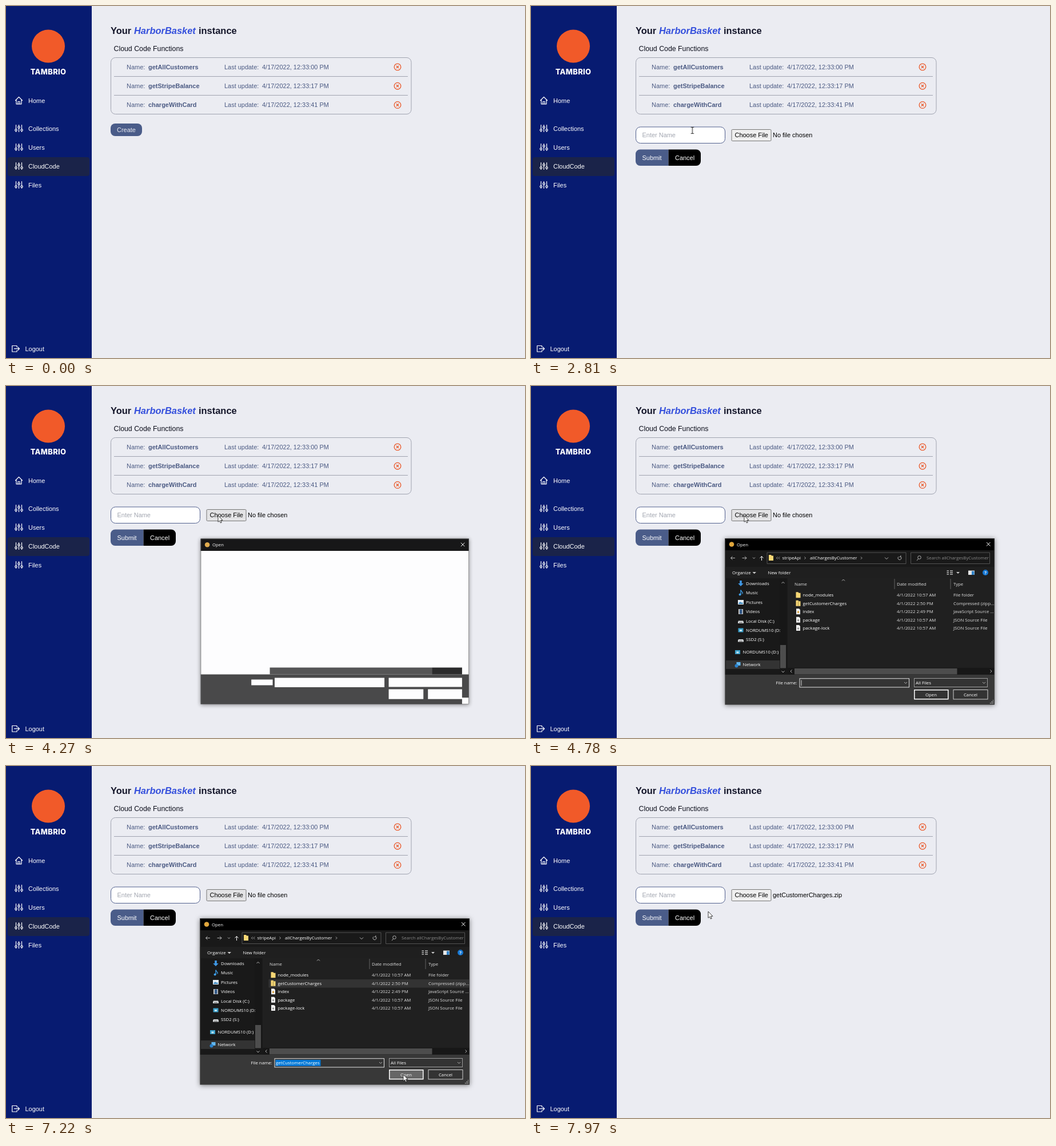
Animation of 908x617 px, one loop 8 s. Source, as an HTML page:

```html
<!DOCTYPE html>
<html lang="en">
<head>
<meta charset="utf-8">
<title>Cloud code upload</title>
<style>
html, body { margin: 0; width: 100%; height: 100%; overflow: hidden; background: #ebecf2; }
svg { display: block; }
text { font: 10.96px "Liberation Sans", Arial, sans-serif; white-space: pre; }
.b { font-weight: 700; }
.accent { fill: #4b5a83; }
.nav text { fill: #fff; }
.line { fill: none; stroke: #fff; stroke-width: 1.2; stroke-linecap: round; stroke-linejoin: round; }
h1, .title { font-size: 16.44px; font-weight: 700; }
#dialog text { font: 7.8px "Open Sans", "Noto Sans", sans-serif; fill: #fff; }
#dialog .dim { fill: #8b8b8b; }
#dialog .soft { fill: #dedede; }
.thin { fill: none; stroke: #b5b5b5; stroke-width: 1; }

/* One 8 s timeline shared by every part */
.t { animation: 8s step-end infinite; }
#create { animation-name: create; }
#createBox { animation-name: createHover; }
#form { animation-name: form; }
#choose { animation-name: choose; }
#noFile { animation-name: noFile; }
#picked { animation-name: picked; }
#dialog { animation-name: dialog; animation-timing-function: linear; transform-origin: 575.5px 412.5px; }
#skeleton { animation-name: skeleton; }
#content { animation-name: content; }
#row { animation-name: row; }
#caret { animation-name: caret; }
#fileName { animation-name: fileName; }
#marked { animation-name: marked; }
#openBtn { animation-name: openBtn; }
#pointer { animation-name: pointer; animation-timing-function: ease-in-out; }
#arrow { animation-name: arrow; }
#hand { animation-name: hand; }
#beam { animation-name: beam; }

@keyframes create { 0% { visibility: visible } 26.375%, 100% { visibility: hidden } }
@keyframes createHover { 0% { fill: #4a5c89 } 22.1%, 100% { fill: #3b4b76 } }
@keyframes form { 0% { visibility: hidden } 26.375%, 100% { visibility: visible } }
@keyframes choose { 0% { fill: #efefef } 39.6% { fill: #e3e3e5 } 92.2%, 100% { fill: #efefef } }
@keyframes noFile { 0% { opacity: 1 } 92.2%, 100% { opacity: 0 } }
@keyframes picked { 0% { opacity: 0 } 92.2%, 100% { opacity: 1 } }
@keyframes dialog {
  0%, 51.24% { opacity: 0; transform: scale(.957) }
  51.25%, 51.74% { opacity: .157; transform: scale(.957) }
  53.6%, 91.6% { opacity: 1; transform: none }
  93.4%, 100% { opacity: 0; transform: scale(.95) }
}
@keyframes skeleton { 0% { visibility: visible } 53.9%, 100% { visibility: hidden } }
@keyframes content { 0% { visibility: hidden } 53.9%, 100% { visibility: visible } }
@keyframes row { 0% { fill: #202020 } 68.4% { fill: #4d4d4d } 70% { fill: #777 } 88.625%, 100% { fill: #333 } }
@keyframes caret { 0% { opacity: 1 } 70%, 100% { opacity: 0 } }
@keyframes fileName { 0% { opacity: 0 } 70%, 100% { opacity: 1 } }
@keyframes marked { 0% { opacity: 0 } 88.625%, 100% { opacity: 1 } }
@keyframes openBtn { 0% { fill: #333 } 79% { fill: #454545 } 88.625%, 100% { fill: #666 } }
@keyframes pointer {
  0%, .6% { transform: translate(892px, 626px) }
  .625% { transform: translate(879px, 610px); animation-timing-function: cubic-bezier(.3, .3, .5, 1) }
  10.625%, 11% { transform: translate(375px, 246px) }
  15.375%, 19.1% { transform: translate(264px, 219px) }
  24.625%, 31% { transform: translate(224px, 217px); animation-timing-function: ease-in }
  35.125% { transform: translate(282px, 218px); animation-timing-function: ease-out }
  41%, 41.4% { transform: translate(374px, 231px) }
  45%, 59.4% { transform: translate(371px, 227px) }
  59.75%, 60.2% { transform: translate(373px, 227px) }
  69.6%, 72% { transform: translate(528.5px, 384px) }
  80% { transform: translate(690px, 535px) }
  83.5% { transform: translate(712px, 526px) }
  86.9%, 91.4% { transform: translate(695px, 541px); animation-timing-function: ease-in }
  98.4% { transform: translate(375px, 295px); animation-timing-function: ease-out }
  99.6%, 100% { transform: translate(310px, 255px) }
}
@keyframes arrow { 0% { opacity: 1 } 22.1% { opacity: 0 } 38.3%, 100% { opacity: 1 } }
@keyframes hand { 0% { opacity: 0 } 22.1% { opacity: 1 } 26.375%, 100% { opacity: 0 } }
@keyframes beam { 0% { opacity: 0 } 26.375% { opacity: 1 } 38.3%, 100% { opacity: 0 } }
</style>
</head>
<body>
<svg width="908" height="617" viewBox="0 0 908 617">
  <defs>
    <g id="sliders" class="line">
      <path d="M-5-6V1M-5 5V6M0-6V-4M0 0V6M5-6V1M5 5V6"/>
      <circle cx="-5" cy="3" r="1.7"/><circle cy="-2" r="1.7"/><circle cx="5" cy="3" r="1.7"/>
    </g>
    <g id="remove" fill="none" stroke="#ea5a2c" stroke-width="1.3">
      <circle r="5.8"/><path d="M-2.2-2.2 2.2 2.2M2.2-2.2-2.2 2.2"/>
    </g>
    <path id="folder" d="M-4-5h4l1 1.5h3V5h-8z" fill="#f8d775"/>
    <g id="zip"><use href="#folder"/><path d="M0-3V5" stroke="#857443" stroke-width="1.6" stroke-dasharray="1 1"/></g>
    <g id="doc"><path d="M-3.5-5h5l2 2v8h-7z" fill="#f1f1f1"/><path d="M-1.5-.5h3v3h-3z" fill="#9c9c9c"/></g>
    <g id="script"><path d="M-3.5-5h5l2 2v8h-7z" fill="#f1f1f1"/><path d="M-1.5-.5h3v3h-3z" fill="#d9a13c"/></g>
    <path id="down" d="M-1.8-5h3.6v5h3L0 5-4.8 0h3z" fill="#3f97e4"/>
    <g id="note"><path d="M0 3V-5q1 3 3 4v3" fill="none" stroke="#3f9fe8" stroke-width="1.3"/><circle cx="-1.4" cy="3" r="2" fill="#3f9fe8"/></g>
    <g id="image"><path d="M-5-4H5V4H-5z" fill="#e8f1f8"/><path d="M-4 2-1-1 1 1 2.5 0 4 2v1h-8z" fill="#3d89c0"/></g>
    <g id="film"><path d="M-4-4.5h8v9h-8z" fill="#c9c9c9"/><path d="M-2-4h4.5v8H-2z" fill="#345a88"/></g>
    <g id="disk"><path d="M-4-.5H4L5 1.5V4H-5V1.5z" fill="#d3d6d8"/><path d="M-3 2.5H3" stroke="#666"/></g>
    <g id="drive"><path d="M-4.5-3.5h9v7h-9z" fill="#3a9ec9"/><path d="M-2-1h4v3h-4z" fill="#c7e7f3"/></g>
    <g id="net"><path d="M-2-4.5h7v6h-7z" fill="#62b6ee"/><circle cx="-2" cy="2" r="3" fill="#2b82cc"/></g>
  </defs>

  <rect width="908" height="617" fill="#ebecf2"/>

  <g class="nav">
    <rect width="150" height="617" fill="#071b71"/>
    <circle cx="74" cy="70.5" r="29" fill="#f15a29"/>
    <text x="74" y="119.5" text-anchor="middle" style="font:800 12.9px Inter,sans-serif;letter-spacing:.3px">TAMBRIO</text>
    <rect x="3" y="265" width="143" height="33" rx="4" fill="#1a2349"/>
    <path class="line" d="M16.5 165.5 22.5 159.500 28.500 165.500M18 164.500V171.800H27V164.500M21 171.500V167.500H24V171.500"/>
    <path class="line" d="M19 598V595.500H10.800V606H19V603.500M14.500 600.700H23.500M20.800 598 23.500 600.700 20.800 603.500"/>
    <text x="39" y="170">Home</text>
    <text x="33.500" y="605">Logout</text>
    <g id="menu"></g>
  </g>

  <text class="title" x="183" y="48.500" fill="#14162a">Your</text>
  <text class="title" x="224" y="48.500" fill="#3550dc" font-style="italic" style="font-style:italic">HarborBasket</text>
  <text class="title" x="337" y="48.500" fill="#14162a">instance</text>
  <text x="188.500" y="79" style="font-size:12.33px" fill="#0d0f1c">Cloud Code Functions</text>
  <rect x="183.500" y="90.500" width="525.500" height="99" rx="8" fill="none" stroke="#a0a3b0"/>
  <path d="M189 123.500H703M189 156.500H703" stroke="#a0a3b0"/>
  <g id="functions"></g>

  <g id="create" class="t">
    <rect id="createBox" class="t" x="183" y="206" width="55" height="22" rx="8"/>
    <text x="194" y="220.800" fill="#ebecf2">Create</text>
  </g>

  <g id="form" class="t">
    <rect x="183.500" y="212" width="156" height="28.500" rx="8" fill="#fff" stroke="#505f8d"/>
    <text x="194.500" y="230" fill="#a2a6b0">Enter Name</text>
    <rect id="choose" class="t" x="351" y="216.500" width="69" height="20" rx="1.500" stroke="#767676"/>
    <text x="356.500" y="230">Choose File</text>
    <text id="noFile" class="t" x="423" y="230">No file chosen</text>
    <text id="picked" class="t" x="423" y="230">getCustomerCharges.zip</text>
    <path d="M240.500 251.500H191a8 8 0 0 0-8 8V272a8 8 0 0 0 8 8H240.500z" fill="#4a5c89"/>
    <path d="M240.500 251.500H289a8 8 0 0 1 8 8V272a8 8 0 0 1-8 8H240.500z"/>
    <text x="194.500" y="269.500" fill="#fff">Submit</text>
    <text x="252" y="269.500" fill="#fff">Cancel</text>
  </g>

  <g id="dialog" class="t" style="filter:drop-shadow(0 1px 4px rgba(0,0,0,.5))">
    <rect x="339.500" y="267" width="471.500" height="291.500" fill="#383838"/>
    <rect x="339.500" y="267" width="471.500" height="21.500"/>
    <circle cx="351" cy="277.500" r="4.300" fill="#e0a63c"/>
    <text x="360" y="280.500">Open</text>
    <path d="M797 274 803.500 280.500M803.500 274 797 280.500" stroke="#fff"/>

    <g id="skeleton" class="t" fill="#fff">
      <path d="M339.500 288.500H811V506H339.500zM428.500 515H466V525H428.500zM469.500 512H662.500V528.500H469.500zM670 512H799V528H670zM670 532H731V549.500H670zM739 532H799V549.500H739zM799 547H811V558.500H799z"/>
      <path d="M461 494H746V506H461z" fill="#454545"/>
      <path d="M746 494H799V506H746z" fill="#171717"/>
    </g>

    <g id="content" class="t">
      <path d="M339.500 288.500H811V506H339.500z" fill="#191919"/>
      <path d="M449 337H811V494H449z" fill="#202020"/>
      <path d="M339.500 317H811V337H339.500z" fill="#1f1f1f"/>
      <path d="M413 292H656V311.500H413zM664.500 292H802.500V311.500H664.500z" class="thin" style="stroke:#535353"/>
      <path class="thin" d="M357 301.500H349.500M352.500 298.500 349.500 301.500 352.500 304.500M369.500 301.500H377M374 298.500 377 301.500 374 304.500"/>
      <path class="thin" style="stroke:#fff" d="M403.500 306V298.500M400.500 301.500 403.500 298.500 406.500 301.500"/>
      <path class="thin" d="M388 300.500 390 302.500 392 300.500M619 300.500 622 303.500 625 300.500M478.500 299.500 480.500 301.500 478.500 303.500M577 299.500 579 301.500 577 303.500M431.500 299.500 429.500 301.500 431.500 303.500M435 299.500 433 301.500 435 303.500M646.500 299A3 3 0 1 1 643 299.300M646.800 297V299.500H644.500M677.500 303 675 306"/>
      <circle class="thin" cx="679.500" cy="300.500" r="2.800"/>
      <use href="#folder" x="420" y="301"/>
      <text x="439.500" y="304.300">stripeApi</text>
      <text x="488" y="304.300">allChargesByCustomer</text>
      <text class="dim" x="692" y="304.300">Search allChargesByCustomer</text>
      <text x="352" y="330">Organize</text>
      <text x="414.500" y="330">New folder</text>
      <path d="M387.500 326H394L390.700 329.300zM744 326H750L747 329z" fill="#ccc"/>
      <path d="M727.500 324H731M727.500 327H731M727.500 330H731M733 324H738M733 327H738M733 330H738" stroke="#bbb" stroke-width="1.500"/>
      <path d="M765 323.500H776V331H765z" fill="#e6e6e6"/><path d="M771 324.500H775.500V331H771z" fill="#3083c9"/>
      <circle cx="795" cy="327" r="5" fill="#1677d2"/>
      <text class="b" x="795" y="330" text-anchor="middle" style="font-weight:700">?</text>

      <path d="M341 481H435.500V496H341z" fill="#333"/>
      <path d="M435.500 337H447V505H435.500z" fill="#171717"/>
      <path d="M436 454H446V494.500H436z" fill="#4d4d4d"/>
      <path class="thin" d="M438.500 346 441 343.500 443.500 346M438.500 499.500 441 502 443.500 499.500"/>
      <g id="tree"></g>

      <path d="M636 338V356M734 338V356" stroke="#636363"/>
      <path class="thin" d="M544 341.500 546.500 339 549 341.500"/>
      <text class="soft" x="461" y="349.800">Name</text>
      <text class="soft" x="640" y="349.800">Date modified</text>
      <text class="soft" x="739" y="349.800">Type</text>
      <rect id="row" class="t" x="459.500" y="374" width="351" height="14.500"/>
      <g id="files"></g>
      <path d="M449 494H811V506H449z" fill="#171717"/>
      <path d="M461 495H745.500V505.500H461z" fill="#4d4d4d"/>
      <path class="thin" d="M456.500 497.500 454 500 456.500 502.500M803.500 497.500 806 500 803.500 502.500"/>

      <text x="428.500" y="523.300">File name:</text>
      <rect x="470" y="512.800" width="191.500" height="15.200" fill="#343434" stroke="#e4e4e4"/>
      <path id="caret" class="t" d="M473 515.500V525.500" stroke="#fff" stroke-width=".8"/>
      <rect id="marked" class="t" x="471.500" y="515" width="79" height="11" fill="#0078d7"/>
      <text id="fileName" class="t" x="472" y="523.300">getCustomerCharges</text>
      <rect x="670.500" y="512.500" width="128" height="15" fill="#333" stroke="#9b9b9b"/>
      <text x="673" y="523.300">All Files</text>
      <path class="thin" d="M653 519 655.500 521.500 658 519M790 519 792.500 521.500 795 519"/>
      <rect id="openBtn" class="t" x="670.800" y="532.800" width="59" height="16" stroke="#fff" stroke-width="1.500"/>
      <rect x="739" y="532.500" width="60" height="16.500" fill="#333" stroke="#d0d0d0"/>
      <text x="700" y="543.500" text-anchor="middle">Open</text>
      <text x="769" y="543.500" text-anchor="middle">Cancel</text>
      <path d="M803 556H809M805.500 553.500H809M808 551H809" stroke="#bbb" stroke-width="1.300" stroke-dasharray="1.300 1"/>
    </g>
    <rect x="339.800" y="267.300" width="471" height="291" fill="none" stroke="#555" stroke-width=".6"/>
  </g>

  <g id="pointer" class="t">
    <path id="arrow" class="t" d="M0 0V11.300L2.600 9 4.300 13 6.200 12.200 4.500 8.300H8z" fill="#fff" stroke="#111" stroke-width=".8"/>
    <path id="hand" class="t" d="M-1.200-4.500q1.200-1.200 2.200 0V0q1-.8 1.900.2 1-.6 1.900.3 1.200-.3 1.700.8V5q0 2-1.300 4H0Q-1.500 6-4 3.500q0-1.800 2.800 0z" fill="#fff" stroke="#111" stroke-width=".8"/>
    <path id="beam" class="t" d="M-2.500-5.500H-1L0-5 1-5.500H2.500M0-5V5M-2.500 5.500H-1L0 5 1 5.500H2.500" fill="none" stroke="#111"/>
  </g>
</svg>
<script>
const fill = (id, items, draw) => {
  document.getElementById(id).innerHTML = items.map(draw).join('');
};
const icon = (name, x, y) => `<use href="#${name}" x="${x}" y="${y}"/>`;
const label = (text, x, y, cls = '') => `<text class="${cls}" x="${x}" y="${y}">${text}</text>`;

fill('menu', ['Collections', 'Users', 'CloudCode', 'Files'], (name, i) =>
  icon('sliders', 22.5, 214.5 + i * 33) + label(name, 39, 219.2 + i * 32.9));

fill('functions', [['getAllCustomers', '00'], ['getStripeBalance', '17'], ['chargeWithCard', '41']], ([name, sec], i) => {
  const y = 110.5 + i * 33.3;
  return label('Name:', 211, y, 'accent') + label(name, 249, y, 'accent b') +
    label('Last update:', 382, y, 'accent') + label(`4/17/2022, 12:33:${sec} PM`, 448, y, 'accent') +
    icon('remove', 685, y - 3.6);
});

fill('tree', [
  ['down', 'Downloads', 346, 376], ['note', 'Music', 362.5, 376], ['image', 'Pictures', 379, 376],
  ['film', 'Videos', 395.5, 376], ['disk', 'Local Disk (C:)', 412, 376], ['drive', 'NORDUMS10 (D:', 428, 376],
  ['disk', 'SSD2 (S:)', 444.5, 376], ['drive', 'NORDUMS10 (D:)', 466.5, 370.5], ['net', 'Network', 488.5, 370.5]
], ([kind, name, y, x]) => icon(kind, x - 9, y) + label(name, x, y + 2.8));

fill('files', [
  ['folder', 'node_modules', '10:57', 'File folder'],
  ['zip', 'getCustomerCharges', '2:50', 'Compressed (zipp...'],
  ['script', 'index', '2:49', 'JavaScript Source ...'],
  ['doc', 'package', '10:57', 'JSON Source File'],
  ['doc', 'package-lock', '10:57', 'JSON Source File']
], ([kind, name, time, type], i) => {
  const y = 369.3 + i * 14.45, half = time < '2' ? 'AM' : 'PM';
  return icon(kind, 467.5, y - 3) + label(name, 475.5, y) +
    label(`4/1/2022 ${time} ${half}`, 640, y, 'soft') + label(type, 739, y, 'soft');
});
</script>
</body>
</html>
```
